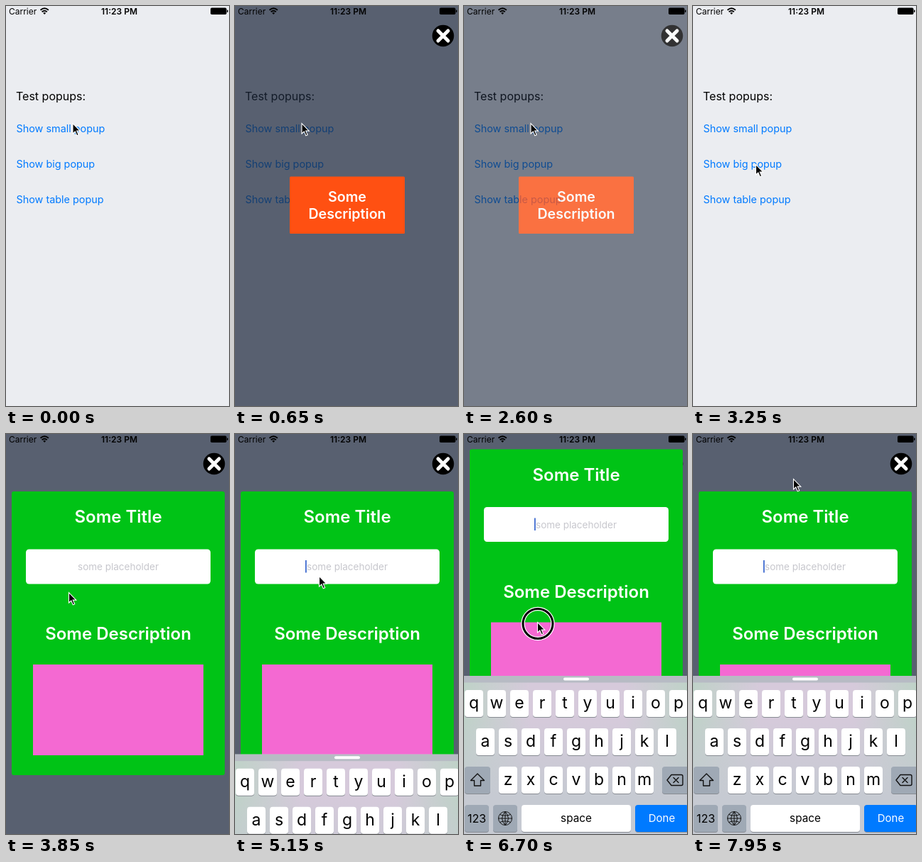
Animation of 314 by 564 pixels, one loop 8000 ms. Source, as an HTML page:

```html
<!DOCTYPE html>
<html lang="en">
<head>
<meta charset="utf-8">
<title>Popups</title>
<style>
  html, body { margin: 0; height: 100%; overflow: hidden; background: #ebedf1; }
  svg { display: block; width: 100vw; height: 100vh; font-family: Inter, Roboto, sans-serif; }
  .mid { text-anchor: middle; }
  .head { font-size: 24px; font-weight: 600; fill: #fff; }
  .link { font-size: 14.4px; fill: #007aff; }
  .line { fill: none; stroke: #111; stroke-width: 1.4; stroke-linejoin: round; stroke-linecap: round; }
</style>
</head>
<body>
<svg viewBox="0 0 314 564">
  <defs>
    <linearGradient id="tint">
      <stop offset="0" stop-color="#bfd2c8"/>
      <stop offset=".3" stop-color="#d6cadb"/>
      <stop offset=".72" stop-color="#d6cadb"/>
      <stop offset="1" stop-color="#bfd2c8"/>
    </linearGradient>
    <linearGradient id="haze" x2="0" y2="1">
      <stop offset=".25" stop-color="#c6cad2" stop-opacity="0"/>
      <stop offset=".75" stop-color="#c6cad2"/>
    </linearGradient>
  </defs>

  <rect width="314" height="564" fill="#ebedf1"/>
  <text x="14" y="133" font-size="16">Test popups:</text>
  <text class="link" x="14.5" y="178">Show small popup</text>
  <text class="link" x="14.5" y="228">Show big popup</text>
  <text class="link" x="14.5" y="278">Show table popup</text>

  <g id="layer">
    <rect width="314" height="564" fill="#1b263a" opacity=".7"/>
    <circle cx="293" cy="42" r="15.3"/>
    <path d="M286 35l14 14m0-14l-14 14" stroke="#fff" stroke-width="5" stroke-linecap="round"/>
    <g id="small" class="mid" font-size="19.6" font-weight="600" fill="#fff">
      <rect x="77" y="240.500" width="162" height="80.500" rx="1.500" fill="#ff5012"/>
      <text x="158" y="276">Some</text>
      <text x="158" y="300">Description</text>
    </g>
    <g id="big" class="mid">
      <rect x="8" y="81" width="300" height="400" rx="3" fill="#00c316"/>
      <text class="head" x="158" y="125">Some Title</text>
      <rect x="28" y="162.500" width="260" height="49" rx="4.500" fill="#fff"/>
      <text x="158" y="192" font-size="13.5" fill="#c7c7cd">some placeholder</text>
      <rect id="caret" x="99" y="178" width="1.800" height="17.500" fill="#3f6bd0"/>
      <text class="head" x="158" y="290">Some Description</text>
      <rect x="38" y="325" width="240" height="128" fill="#f469d2"/>
    </g>
  </g>

  <g id="keyboard" class="mid">
    <rect y="341" width="314" height="223" fill="url(#tint)"/>
    <rect y="341" width="314" height="223" fill="url(#haze)"/>
    <rect y="341" width="314" height="9.500" fill="#b7bbc4"/>
    <rect x="140" y="343.500" width="36" height="4" rx="2" fill="#fff"/>
    <g id="keys"></g>
    <path class="line" d="M19 479l-9.500 9.500h5v7.500h9v-7.500h5z"/>
    <path class="line" d="M286 488l6-7.500h14q2 0 2 2v11q0 2-2 2h-14zM295 484.500l7 7m0-7l-7 7"/>
    <path class="line" style="stroke-width:1" d="M48.500 542a9.500 9.500 0 1 0 19 0a9.500 9.500 0 1 0-19 0h19M58 532.500v19M58 532.500q-9 9.500 0 19q9-9.500 0-19M50.500 536.500q7.500 3.500 15 0M50.500 547.500q7.500-3.500 15 0"/>
  </g>

  <text x="4" y="12" font-size="12">Carrier</text>
  <text class="mid" x="159.500" y="12" font-size="12" font-weight="600">11:23 PM</text>
  <g fill="none" stroke="#000" stroke-width="1.800">
    <path d="M48.500 5.800q5.700-5 11.400 0M50.600 8.200q3.600-3 7.200 0"/>
    <path d="M52.200 9.700q2-1.500 4 0l-2 2.300z" fill="#000" stroke="none"/>
  </g>
  <rect x="288" y="2.500" width="22.500" height="9.500" rx="1.800"/>
  <rect x="311" y="5.500" width="1.500" height="3.500" rx=".7"/>

  <g id="pointer">
    <g id="ring" fill="none">
      <circle cx="1" cy="2.500" r="21" stroke="#fff" stroke-width="5.400"/>
      <circle cx="1" cy="2.500" r="21" stroke="#000" stroke-width="3"/>
    </g>
    <path d="M.5 .5V15l3.300-3 2.500 5.700 2.400-1-2.500-5.600h4.600z" stroke="#fff" stroke-width="1.100"/>
  </g>
</svg>
<script>
const $ = id => document.getElementById(id);
const WHITE = '#fff', GREY = '#9fa9b5';

// Keyboard
let keyMarkup = '';
function addKey(x, y, w, fill, label = '', size = 23, base = 26, ink = '#000') {
  keyMarkup += `<rect x="${x}" y="${y + 1}" width="${w}" height="38" rx="4" fill="#878b92"/>
    <rect x="${x}" y="${y}" width="${w}" height="38" rx="4" fill="${fill}"/>
    <text x="${x + w / 2}" y="${y + base}" font-size="${size}" fill="${ink}">${label}</text>`;
}
[['qwertyuiop', 1], ['asdfghjkl', 17], ['zxcvbnm', 49]].forEach(([letters, left], row) =>
  [...letters].forEach((c, i) => addKey(left + 32 * i, 361 + 54 * row, 26, WHITE, c)));
addKey(1, 469, 36, GREY);
addKey(279, 469, 38, GREY);
addKey(1, 523, 34, GREY, '123', 16, 25);
addKey(41, 523, 34, GREY);
addKey(81, 523, 154, WHITE, 'space', 15.3, 23.5);
addKey(241, 523, 75, '#007aff', 'Done', 15, 23.5, '#fff');
$('keys').innerHTML = keyMarkup;

// Each track lists [time, value], eased between neighbours
const linear = p => p, smooth = p => p * p * (3 - 2 * p);
function track(keys, t, ease = smooth) {
  const i = keys.findIndex(k => k[0] > t);
  if (i < 0) return keys[keys.length - 1][1];
  if (!i) return keys[0][1];
  const [t0, a] = keys[i - 1], [t1, b] = keys[i];
  return a + (b - a) * ease((t - t0) / (t1 - t0));
}

const FADE = [[50, 0], [400, 1], [850, 1], [1200, 0], [1300, 0], [1650, 1],
  [2525, 1], [2875, 0], [3450, 0], [3800, 1]];
const POINTER_X = [[2850, 93.5], [3250, 88], [3900, 88], [4300, 118], [6150, 118], [6400, 107],
  [6700, 103], [7050, 103], [7500, 141]];
const POINTER_Y = [[2850, 165], [3250, 223], [3900, 223], [4300, 198], [5100, 198], [5600, 268],
  [5800, 268], [6000, 250], [6150, 243], [6400, 324], [6700, 265], [7050, 265], [7500, 63]];
const SCROLL = [[5800, 0], [6000, -18], [6150, -25], [6400, 0], [6700, -59.5], [7050, -59.5], [7500, 0]];
const KEYBOARD = [[4950, 223], [5350, 0]];
const PRESSES = [[4500, 4550], [5800, 6200], [6400, 7050]];

const show = (id, on) => $(id).setAttribute('visibility', on ? 'inherit' : 'hidden');
const move = (id, x, y) => $(id).setAttribute('transform', `translate(${x} ${y})`);

function draw(t) {
  const bigOpen = t >= 3450;
  $('layer').setAttribute('opacity', track(FADE, t, linear));
  show('small', !bigOpen);
  show('big', bigOpen);
  show('caret', t >= 5000 && (t - 5000) % 1150 < 700);
  move('big', 0, track(SCROLL, t));
  move('keyboard', 0, track(KEYBOARD, t));
  move('pointer', track(POINTER_X, t), track(POINTER_Y, t));
  show('ring', PRESSES.some(([from, to]) => t >= from && t < to));
}

const start = performance.now();
function tick() {
  draw((performance.now() - start) % 8000);
  requestAnimationFrame(tick);
}
tick();
</script>
</body>
</html>
```
